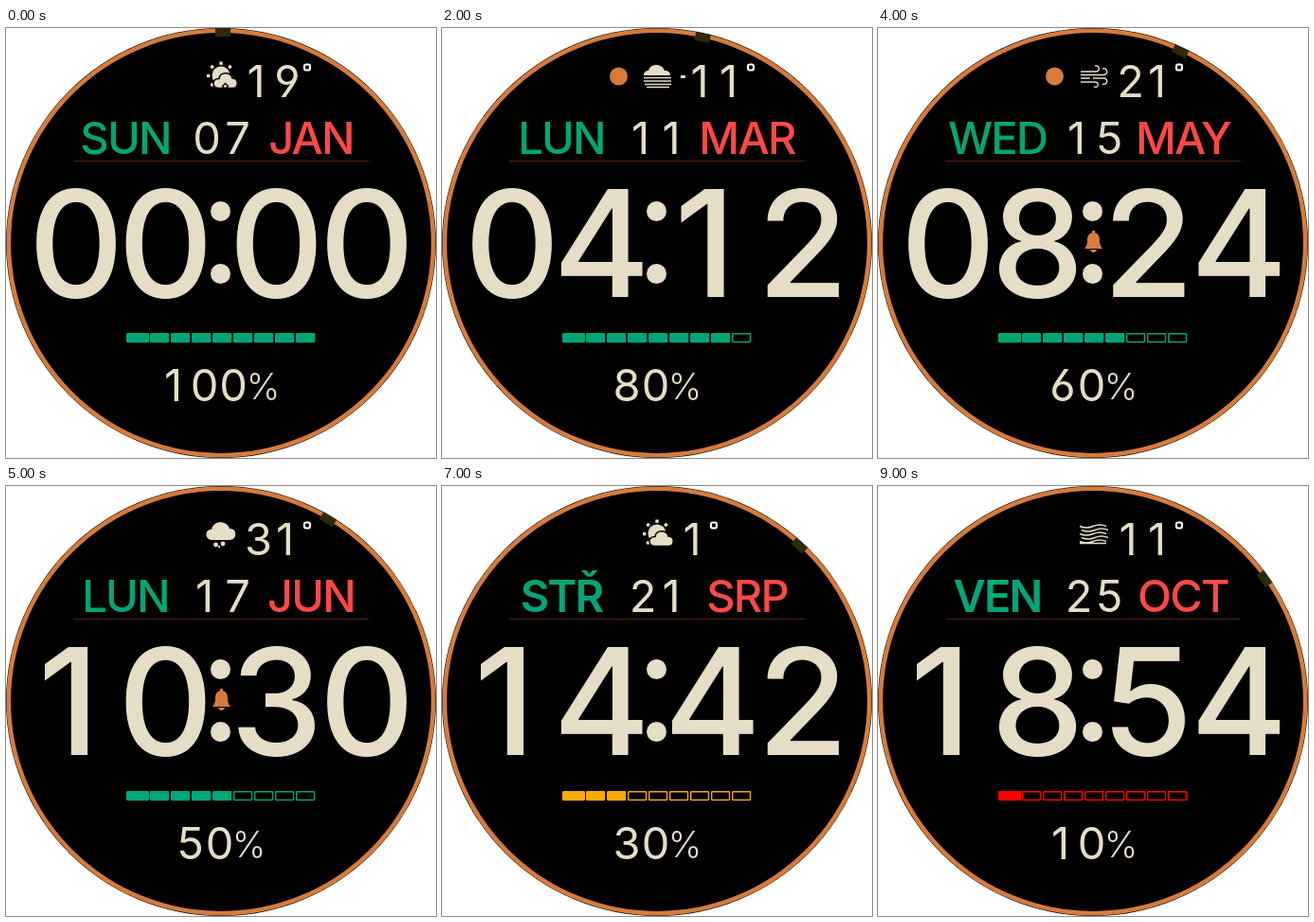
Recreate the animation shown at these times as an HTML page. Size 454 px wide and 454 px high, loop 10000 ms.

```html
<!DOCTYPE html>
<html lang="en">
<head>
<meta charset="utf-8">
<title>Watch face</title>
<style>
  html, body { margin: 0; width: 100%; height: 100%; overflow: hidden; background: #fff; }
  svg { display: block; width: 454px; height: 454px; }
  /* cv03 and cv04 give the 6 and 9 with straight stems */
  text { font-family: Inter, "Open Sans", sans-serif; font-feature-settings: "cv03", "cv04"; text-anchor: middle; }
  .word { letter-spacing: -1.8px; }
</style>
</head>
<body>
<svg id="face" viewBox="0 0 454 454">
  <circle cx="227" cy="227" r="227"/>
  <circle cx="227" cy="227" r="224.2" fill="none" stroke="#d67b3c" stroke-width="4.6"/>
  <path d="M71 140.5H383" stroke="#4e210e"/>
  <g fill="#e5ddc6"><circle cx="226.5" cy="193.5" r="10.5"/><circle cx="226.5" cy="259.5" r="10.5"/></g>
  <g id="scene"></g>
</svg>
<script>
const STEP = 1000;
const CREAM = '#e5ddc6', ORANGE = '#d67b3c', GREEN = '#00a677', YELLOW = '#f5aa00', RED = '#ff0000';

const row = (time, day, date, month, temp, sky, level, link, alarm) =>
  ({ time, day, date, month, temp, sky, level, link, alarm });
const states = [
  row('0000', 'SUN', '07', 'JAN', 19, 'haze', 100, 0, 0),
  row('0206', 'VEN', '09', 'FEV', -13, 'snow', 90, 1, 0),
  row('0412', 'LUN', '11', 'MAR', -11, 'fog', 80, 1, 0),
  row('0618', 'SAB', '13', 'APR', 15, 'rain', 70, 1, 0),
  row('0824', 'WED', '15', 'MAY', 21, 'wind', 60, 1, 1),
  row('1030', 'LUN', '17', 'JUN', 31, 'rain', 50, 0, 1),
  row('1236', 'VEN', '19', 'JUL', 27, 'sun', 40, 0, 0),
  row('1442', 'STŘ', '21', 'SRP', 1, 'sun', 30, 0, 0),
  row('1648', 'MON', '23', 'SEP', 15, 'rain', 20, 0, 0),
  row('1854', 'VEN', '25', 'OCT', 11, 'dust', 10, 0, 0)
];

const text = (s, x, y, size, weight = 400, fill = CREAM, extra = '') =>
  `<text x="${x}" y="${y}" font-size="${size}" font-weight="${weight}" fill="${fill}" ${extra}>${s}</text>`;
const word = (s, x, weight, fill) => text(s, x, 133, 47, weight, fill, 'class="word"');

// Each digit sits in its own cell; the narrow 1 leans a little to the left.
const digits = (s, xs, y, size, weight) => [...s].map((c, i) =>
  text(c, xs[i] - (c === '1' ? size * 0.05 : 0), y, size, weight)).join('');

const dots = (points, r = 2.5) =>
  points.map(([x, y]) => `<circle cx="${x}" cy="${y}" r="${r}" fill="${CREAM}"/>`).join('');
const strokes = (d, w) => `<path d="${d}" fill="none" stroke="${CREAM}" stroke-width="${w}"/>`;
const shape = (d, extra = '') => `<path d="${d}" fill="${CREAM}" ${extra}/>`;

const cloud = shape('M218 57C209 57 210 45 217 46C219 36 233 36 236 45C245 45 244 57 236 57Z');

function sunny() {
  let rays = '';
  for (let a = -135; a <= 45; a += 45)
    rays += `<rect x="225.3" y="35.5" width="3.4" height="3.4" fill="${CREAM}" transform="rotate(${a} 227 50.5)"/>`;
  return rays + dots([[227, 50]], 9.5) +
    shape('M225 63.5C217 63.5 217 53 225 53.5C226 46 237 46 239 53C246 53 246 63.5 239 63.5Z', 'stroke="#000" stroke-width="1.5"');
}

const skies = {
  sun: sunny,
  haze: () => sunny() + '<path d="M231.5 58.5l3 3-3 3-3-3z" fill="none" stroke="#000" stroke-width="1.3"/>',
  snow: () => cloud + dots([[218.5, 62], [227, 62], [235.5, 62]]),
  rain: () => cloud + dots([[221.5, 62], [229, 61]], 2.4) + dots([[225, 64]], 1.2),
  fog: () => shape('M213 50C213 46 216 45 218 45C220 37 232 37 235 45C239 45 241 47 241 50Z') +
    strokes('M213 52.5H242M213 56H242M214 59.5H242M216 62.5H240', 1.3),
  wind: () => strokes('M214 46H230C235 46 234 38 229 40M214 49.5H238C244 49 242 41 237 43M214 53H224M227 53H238C244 53 242 61 237 59M214 57H229C234 57 233 64 228 62', 1.4),
  dust: () => strokes([42.5, 46.5, 50.5, 54.5, 58.5].map((y, i) =>
    `M${213 + i % 2 * 2} ${y}q7 3 14 0t14 0`).join('') + 'M213 60.5H241', 1.5)
};

function temperature(value) {
  const s = String(Math.abs(value)), shift = value < 0 ? 8 : 0;
  const degreeX = (s.length > 1 ? 318 : 287) + shift;
  return digits(s, [266.5 + shift, 297 + shift], 73, 47) +
    (shift ? `<rect x="252" y="50" width="5" height="3" fill="${CREAM}"/>` : '') +
    `<rect x="${degreeX - 3}" y="38.5" width="6" height="6" rx="2" fill="none" stroke="#fff" stroke-width="2.2"/>`;
}

function battery(level) {
  const color = level > 40 ? GREEN : level > 20 ? YELLOW : RED;
  let out = '';
  for (let i = 0; i < 9; i++) {
    const x = i ? 130.7 + 22 * i : 127.7, w = i ? 18.8 : 22.6;
    out += `<rect x="${x}" y="322.7" width="${w}" height="8.8" rx="0.7" stroke="${color}" stroke-width="1.4" fill="${i < level / 10 ? color : 'none'}"/>`;
  }
  const full = level === 100;
  return out + digits(String(level), full ? [179, 209.7, 240] : [195, 225.5], 394, 47) +
    text('%', full ? 271.5 : 256.5, 392, 38, 300);
}

const bell = `<path d="M218 233Q221 230 221 224C221 219 223 217 226 216V214H229V216C232 217 234 219 234 224Q234 230 237 233ZM224 234H231Q230 237 227.5 237T224 234Z" fill="${ORANGE}"/>`;
const linkDot = `<circle cx="186.5" cy="51" r="9.5" fill="${ORANGE}"/>`;

const draw = (s, i) =>
  `<rect x="219" y="0" width="16" height="9" fill="#2d290d" transform="rotate(${i * 6 + 0.5} 227 227)"/>` +
  (s.link ? linkDot : '') + skies[s.sky]() + temperature(s.temp) +
  word(s.day, 126, /VEN|STŘ/.test(s.day) ? 600 : 500, GREEN) +
  digits(s.date, [212, 244.5], 133, 47) +
  word(s.month, 322, 500, '#ff4848') +
  digits(s.time, [74, 168.5, 285.5, 381], 284, 156.5, 450) +
  (s.alarm ? bell : '') + battery(s.level);

const scene = document.getElementById('scene');
let shown = -1;
function tick() {
  const i = Math.floor(performance.now() / STEP) % states.length;
  if (i !== shown) scene.innerHTML = draw(states[i], shown = i);
  requestAnimationFrame(tick);
}
tick();
</script>
</body>
</html>
```
